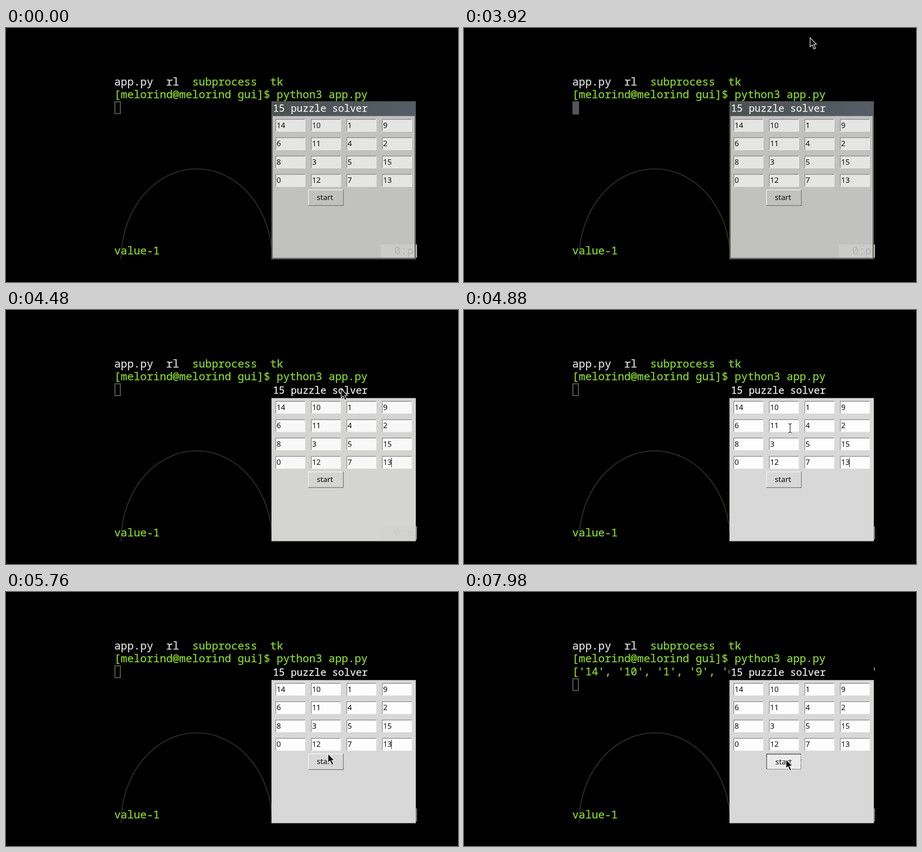
These frames come from a looping animation (998x561 px, 8000 ms). An HTML page:

```html
<!DOCTYPE html>
<html lang="en">
<head>
<meta charset="utf-8">
<title>15 puzzle solver</title>
<style>
  html, body { margin: 0; width: 100%; height: 100%; overflow: hidden; background: #000; }
  svg { display: block; width: 998px; height: 561px; }
  text { white-space: pre; }
  .term { font: 23.92px "Noto Sans Mono", monospace; fill: #87cf2b; stroke: #87cf2b; stroke-width: .45px; }
  .plain { fill: #d6d6d6; stroke: #d6d6d6; }
  .title { font: 21.8px "Noto Sans Mono", monospace; fill: #e9e9e9; stroke: #e9e9e9; stroke-width: .4px; }
  .ui { font: 16.5px "Noto Sans", sans-serif; fill: #252525; stroke: #252525; stroke-width: .2px; }

  .step { animation: 8s step-end infinite; }
  .focused { animation-name: focused; }
  .unfocused { animation-name: unfocused; }
  .block { animation-name: block; }
  .hollow { animation-name: hollow; }
  .caret { animation-name: caret; }
  .hover { animation-name: hover; }
  .before { animation-name: before; }
  .pressed { animation-name: pressed; }
  .output { animation-name: output; }
  .prompt { animation-name: prompt; }
  .body { animation: body 8s infinite; }
  .entry { animation: entry 8s infinite; }
  .ghost { animation: ghost 8s infinite; }

  @keyframes focused { 0% { opacity: 0 } 54%, 100% { opacity: 1 } }
  @keyframes unfocused { 0% { opacity: 1 } 54%, 100% { opacity: 0 } }
  @keyframes block { 0% { opacity: 0 } 28% { opacity: 1 } 54%, 100% { opacity: 0 } }
  @keyframes hollow { 0% { opacity: 1 } 28% { opacity: 0 } 54%, 100% { opacity: 1 } }
  @keyframes caret {
    0%, 61.5%, 72.75%, 84%, 93%, 100% { opacity: 0 }
    54%, 65.25%, 76.5%, 87.7% { opacity: 1 }
  }
  @keyframes hover { 0% { fill: transparent } 73.5%, 100% { fill: #ececec } }
  @keyframes before { 0% { opacity: 1 } 93%, 100% { opacity: 0 } }
  @keyframes pressed { 0% { opacity: 0 } 93%, 100% { opacity: 1 } }
  @keyframes output { 0% { opacity: 0 } 95%, 100% { opacity: 1 } }
  @keyframes prompt { 0% { transform: none } 95%, 100% { transform: translateY(28.7px) } }
  @keyframes body { 0%, 54.5% { fill: #c1c1c0 } 57.5%, 100% { fill: #d8d8d8 } }
  @keyframes entry { 0%, 54.5% { fill: #e5e5e4 } 57.5%, 100% { fill: #fdfdfd } }
  @keyframes ghost { 0%, 54.5% { opacity: 1 } 57.5%, 100% { opacity: 0 } }
</style>
</head>
<body>
<svg viewBox="0 0 998 561">
  <defs>
    <linearGradient id="bar">
      <stop offset="0" stop-color="#4b514f"/>
      <stop offset="1" stop-color="#575d67"/>
    </linearGradient>
    <clipPath id="screen"><rect x="239" y="104" width="670" height="408"/></clipPath>
  </defs>
  <rect width="998" height="561"/>
  <path d="M254 511A167 200 0 0 1 588 511" fill="none" stroke="#282828" stroke-width="2.5"/>

  <g class="term" clip-path="url(#screen)">
    <text x="239" y="126.5"><tspan class="plain">app.py  rl  </tspan>subprocess  tk</text>
    <text x="239" y="155.2">[melorind@melorind gui]$ python3 app.py</text>
    <text class="step output" x="239" y="183.9">['14', '10', '1', '9', '6', '11', '4', '2', '8'</text>
    <text x="239" y="499.6">value-1</text>
  </g>
  <g class="step prompt">
    <rect class="step hollow" x="240.5" y="163" width="12" height="26" fill="none" stroke="#555550" stroke-width="2.4"/>
    <rect class="step block" x="239.5" y="162" width="14.5" height="29" fill="#55555a"/>
  </g>

  <rect x="905" y="478" width="2.5" height="29" fill="#77776f"/>
  <rect x="586" y="162" width="319" height="33"/>
  <rect class="step unfocused" x="586" y="162" width="319" height="33" fill="url(#bar)"/>
  <text class="title" x="589.5" y="184.8">15 puzzle solver</text>
  <rect class="body" x="586" y="194.5" width="319" height="316"/>
  <path class="step focused" d="M904.5 195V510H586.5V195" fill="none" stroke="#b9b9ae"/>
  <g class="ghost">
    <rect x="828" y="478" width="79" height="29" fill="#cbcbc8"/>
    <text class="term" x="857" y="499.6" style="fill:#b4b4ae;stroke:none">0:p</text>
  </g>
  <path class="step unfocused" d="M587.5 163V509H903.5V163Z" fill="none" stroke="#555b54" stroke-width="2.6"/>

  <g id="grid"></g>
  <rect class="step caret" x="850.7" y="326" width="1.2" height="21" fill="#333"/>

  <rect class="step hover" x="667" y="357" width="78" height="36" fill="transparent"/>
  <g class="step before" fill="none" stroke-width="1.4">
    <path d="M668 392V357.5H745" stroke="#f4f4f0"/>
    <path d="M667.5 392.3H744.8V357" stroke="#777"/>
    <text class="ui" x="686.3" y="379.5">start</text>
  </g>
  <g class="step pressed" fill="none" stroke-width="1.4">
    <path d="M668 392V357.5H745" stroke="#888"/>
    <path d="M667.5 392.3H744.8V357" stroke="#f8f8f8"/>
    <rect x="668.5" y="358.5" width="75.5" height="33" stroke="#222" stroke-dasharray="1.4 1.4"/>
    <text class="ui" x="687.8" y="381">start</text>
  </g>

  <g id="pointer" visibility="hidden">
    <path id="arrow" d="M0 0V20L4.5 16L8.5 25L12 23.3L8 14.8H14Z" fill="#080808" stroke="#f2f2f2" stroke-width="1.3"/>
    <g id="beam" fill="none">
      <path d="M-4-10Q0-10 0-7Q0-10 4-10M0-8V8M-4 10Q0 10 0 7Q0 10 4 10" stroke="#fff" stroke-width="4"/>
      <path d="M-4-10Q0-10 0-7Q0-10 4-10M0-8V8M-4 10Q0 10 0 7Q0 10 4 10" stroke="#444" stroke-width="1.6"/>
    </g>
  </g>
</svg>
<script>
  const $ = id => document.getElementById(id);
  const tiles = [14, 10, 1, 9, 6, 11, 4, 2, 8, 3, 5, 15, 0, 12, 7, 13];
  const LEFT = 595, TOP = 201, COL = 78.4, ROW = 40.5, W = 66, H = 28;

  $('grid').innerHTML = tiles.map((n, i) => {
    const x = LEFT + i % 4 * COL, y = TOP + Math.floor(i / 4) * ROW;
    return `<rect class="entry" x="${x}" y="${y}" width="${W}" height="${H}"/>
      <path d="M${x + .7} ${y + H}V${y + .7}H${x + W}" fill="none" stroke="#858585" stroke-width="1.4"/>
      <path d="M${x} ${y + H - .5}H${x + W - .5}V${y}" fill="none" stroke="#eeeeea"/>
      <text class="ui" x="${x + 2.5}" y="${y + 19.6}">${n}</text>`;
  }).join('');

  // Pointer stops: time in ms, x, y
  const stops = [
    [3760, 772, -28], [4260, 740, 174], [4600, 740, 174], [4880, 720, 261],
    [5320, 714, 324], [5440, 714, 324], [5700, 711, 357], [5860, 711, 357],
    [6120, 711, 364], [6280, 711, 364], [6480, 711, 369.5], [8000, 711, 369.5]
  ];

  function pointerAt(t) {
    const i = stops.findIndex(s => s[0] > t);
    const [t0, x0, y0] = stops[i - 1], [t1, x1, y1] = stops[i];
    const p = (t - t0) / (t1 - t0), e = p * p * (3 - 2 * p);
    return [x0 + (x1 - x0) * e, y0 + (y1 - y0) * e];
  }

  function overEntry(x, y) {
    const dx = x - LEFT, dy = y - TOP;
    return dx >= 0 && dy >= 0 && dy < 4 * ROW && dx % COL < W && dy % ROW < H;
  }

  function draw(t) {
    const shown = t >= stops[0][0];
    $('pointer').setAttribute('visibility', shown ? 'visible' : 'hidden');
    if (!shown) return;
    const [x, y] = pointerAt(t), text = overEntry(x, y);
    $('pointer').setAttribute('transform', `translate(${x} ${y})`);
    $('arrow').style.display = text ? 'none' : '';
    $('beam').style.display = text ? '' : 'none';
  }

  const start = performance.now();
  (function frame() {
    draw((performance.now() - start) % 8000);
    requestAnimationFrame(frame);
  })();
</script>
</body>
</html>
```
